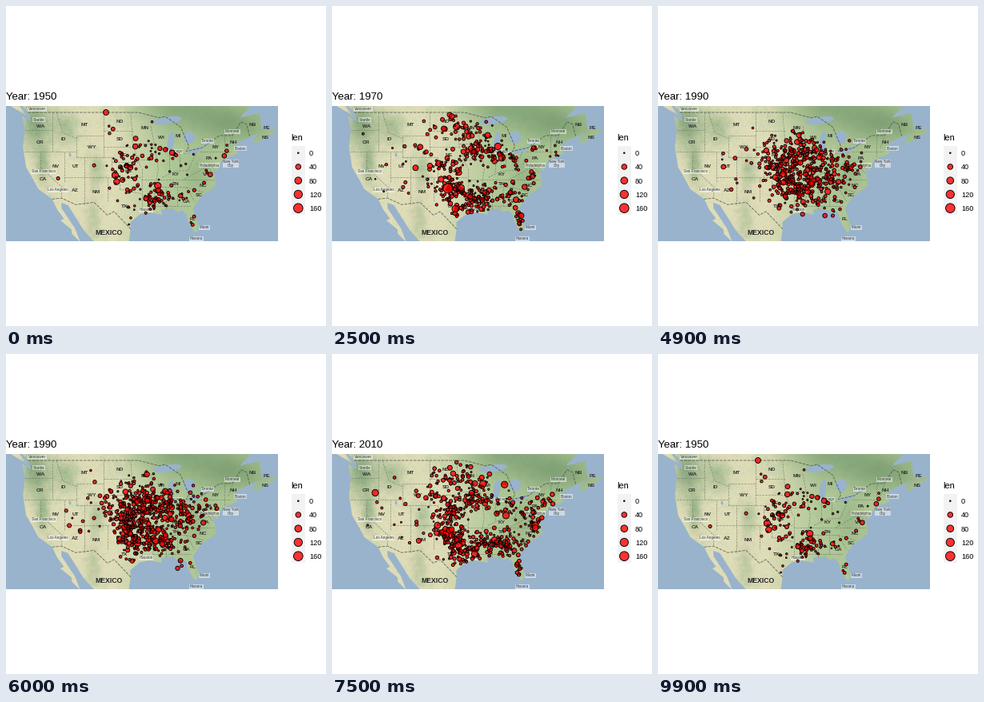
Write a matplotlib script that moves like this. It is 400 by 400 pixels and loops after 10000 ms.

```python
import numpy as np
import matplotlib.pyplot as plt
from matplotlib.animation import FuncAnimation
from matplotlib.patches import Circle, Ellipse, PathPatch, Rectangle
from matplotlib.path import Path

PX = 0.72  # points per pixel at 100 dpi
W, H, TOP = 340, 169, 125
WATER = np.array([153, 179, 204]) / 255
plt.rcParams["font.family"] = "Liberation Sans"

# Outlines, a few key points in lon/lat
PACIFIC = [(-123.2, 49), (-122.4, 47.4), (-124.7, 48.4), (-124, 46.2), (-124.5, 42.8),
           (-124.1, 41), (-123.7, 39), (-121.9, 36.6), (-120.6, 34.6), (-117.1, 32.5)]
MEXICO = [(-115.8, 30.2), (-114.1, 28.2), (-115, 27.8), (-112.2, 25.8), (-112.1, 24.8),
          (-110, 22.9), (-111.3, 26), (-114.7, 30.5), (-114.8, 31.7), (-113.1, 31.2),
          (-109.1, 25.6), (-105.5, 22), (-97.8, 22)]
ATLANTIC = [(-97.2, 25.9), (-97.3, 27.4), (-94.8, 29.2), (-92.3, 29.6), (-89.2, 29.1),
            (-89.5, 30.2), (-86.3, 30.4), (-85.3, 29.7), (-84.2, 30.1), (-83, 29.2),
            (-82.7, 27.8), (-81, 25.2), (-80.3, 25.3), (-80, 26.8), (-81.4, 30.5),
            (-79.2, 33.2), (-75.5, 35.3), (-76.3, 38.9), (-75.2, 38.3), (-74, 40.4),
            (-70, 41.7), (-70.7, 42.6), (-70.2, 43.7), (-67, 44.8)]
MARITIME = [(-64.7, 45.4), (-66.2, 44.3), (-65.6, 43.5), (-60, 46), (-64, 46.1),
            (-64.5, 48.9), (-69.5, 48.1), (-66.5, 50.2), (-59, 51), (-126, 51)]
NORTH = [(-123.2, 49), (-95.2, 49), (-90, 48.1), (-88.4, 48.3), (-84.5, 46.5),
         (-82.4, 43), (-83.1, 42.1), (-79, 42.8), (-76.5, 44.1), (-74.7, 45),
         (-71.5, 45), (-69.2, 47.4), (-67.8, 47), (-67, 44.8)]
SOUTH = [(-117.1, 32.5), (-114.7, 32.7), (-111.1, 31.3), (-106.5, 31.8), (-103.1, 29),
         (-101.4, 29.8), (-97.2, 25.9)]
ISLAND = [(-128.5, 50.7), (-125.3, 50), (-123.4, 48.4), (-127.5, 50)]
# Great Lakes and Salt Lake: centre, size, tilt in pixels
LAKES = [(202, 143, 36, 9, -8), (206, 170, 8, 26, 8), (229, 164, 14, 16, 0),
         (235, 181, 21, 5, -20), (251, 171, 16, 4, -8), (80, 186, 3, 5, 0)]

# Straight state borders as (latitude, west, east) and (longitude, south, north)
PARALLELS = [(46, -124, -117), (42, -124.2, -111), (37, -114, -94.6), (41, -111, -102),
             (45, -111, -104), (45.9, -104, -96.6), (43, -104, -96.5), (40, -102, -95.3),
             (43.5, -96.5, -91.2), (40.5, -95.7, -91.4), (36.5, -94.6, -76), (33, -94, -91),
             (35, -90.2, -83.1), (31, -91.6, -82), (42.5, -90.6, -87.8), (41.7, -87, -83.4),
             (39.7, -80.5, -75.7), (42, -79.8, -71.8)]
MERIDIANS = [(-117, 42, 49), (-120, 39, 42), (-114, 36, 42), (-109, 31.3, 41),
             (-111, 41, 45), (-104, 41, 49), (-102, 37, 41), (-103, 32, 37),
             (-100, 34.6, 36.5), (-94.4, 30, 39), (-87.5, 38, 41.7), (-84.8, 39, 41.7),
             (-88.3, 30.3, 35), (-85.3, 31, 35), (-73.4, 41, 45)]
CURVES = [[(-120, 39), (-114.6, 35), (-114.7, 32.7)],
          [(-116, 49), (-114.4, 45.5), (-111, 44.5)],
          [(-100, 34.6), (-94.4, 33.6)],
          [(-97.2, 49), (-96.5, 43), (-94.6, 39)],
          [(-92.1, 46.7), (-91.2, 43.5), (-90.2, 38.7), (-91.6, 31)],
          [(-89.2, 37), (-85.8, 38.3), (-82.6, 38.4), (-80.5, 42)],
          [(-83.1, 35), (-81, 32)], [(-83.1, 35), (-78.6, 33.9)],
          [(-83.7, 36.6), (-77.8, 39.2), (-76.3, 37.9)], [(-72.5, 42.7), (-71.1, 45.3)]]

STATES = dict(MT=(98, 148), ND=(142, 145), MN=(174, 153), WA=(43, 150), OR=(43, 170),
              ID=(72, 167), WY=(107, 176), SD=(142, 166), NE=(146, 186), NV=(62, 200),
              UT=(87, 201), CA=(46, 217), AZ=(86, 231), NM=(113, 232), TX=(148, 250),
              KS=(153, 206), WI=(194, 165), MI=(215, 163), KY=(212, 211), VA=(250, 211),
              TN=(212, 222), AL=(208, 240), GA=(226, 244), FL=(234, 266), PA=(254, 190),
              NY=(262, 177), NH=(284, 171), NB=(308, 149), PE=(326, 153), NS=(324, 164),
              NC=(246, 224), SC=(241, 237))
CITIES = {"Vancouver": (39, 129), "Seattle": (41, 142), "San Francisco": (47, 207),
          "Los Angeles": (65, 230), "Chicago": (212, 182), "Toronto": (252, 169),
          "Montreal": (283, 157), "Boston": (293, 178), "New York\nCity": (281, 197),
          "Philadelphia": (254, 199), "Houston": (175, 255), "Miami": (248, 277),
          "Havana": (238, 291)}

# Storm regions: centre and spread in pixels
REGIONS = np.array([
    (148, 202, 10, 14),   # central plains
    (165, 155, 17, 10),   # northern plains
    (183, 182, 15, 8),    # corn belt
    (225, 190, 14, 9),    # Ohio valley
    (152, 229, 13, 7),    # Oklahoma
    (160, 251, 11, 9),    # Texas
    (188, 239, 12, 8),    # lower Mississippi
    (222, 237, 11, 8),    # Georgia
    (236, 266, 4, 7),     # Florida
    (253, 212, 7, 11),    # Atlantic coast
    (272, 182, 10, 6),    # New England
    (85, 190, 28, 25),    # far west
    (125, 190, 8, 17),    # high plains
])
# Storms per year and the share of each region
YEARS = {
    1950: (175, [24, 2, 8, 9, 9, 9, 28, 5, 3, 4, 3, 1, 1]),
    1960: (340, [16, 14, 14, 12, 12, 6, 12, 7, 4, 4, 3, 2, 4]),
    1970: (460, [9, 14, 15, 9, 19, 7, 19, 5, 6, 4, 4, 3, 3]),
    1980: (540, [4, 8, 25, 14, 9, 12, 17, 13, 4, 8, 1, 4, 7]),
    1990: (800, [22, 8, 20, 13, 10, 8, 13, 7, 3, 7, 3, 3, 7]),
    2000: (680, [17, 11, 13, 9, 12, 12, 18, 9, 4, 6, 2, 5, 4]),
    2010: (600, [13, 12, 15, 9, 10, 8, 17, 10, 4, 6, 3, 4, 5]),
    2020: (580, [4, 11, 16, 4, 9, 6, 27, 14, 5, 10, 3, 4, 5]),
}
# The longest tracks: x, y, length
LONGEST = {1950: (125, 133, 45), 1970: (145, 228, 170), 1980: (139, 259, 130)}
NAMES = list(YEARS)
STARTS = [9, 22, 35, 48, 60, 72, 84, 96]  # frames where a year begins to leave


def project(points):
    """Web Mercator, lon/lat to stage pixels."""
    lon, lat = np.array(points, float).T
    north = np.degrees(np.log(np.tan(np.radians(45 + lat / 2))))
    return np.column_stack([(lon + 128.8) * 4.93, 133 + (56.37 - north) * 4.93])


def outline(points):
    return Path(project(points + points[:1]))


def radius(length):
    return 0.8 + 5 * np.sqrt(length / 160)


def make_year(year):
    """Rows of x, y, radius drawn from the regional mix."""
    rng = np.random.default_rng(year)
    count, share = YEARS[year]
    pick = rng.choice(len(REGIONS), count * 2, p=np.array(share) / sum(share))
    pos = rng.normal(REGIONS[pick, :2], REGIONS[pick, 2:])
    pos = pos[usa.contains_points(pos)][:count]
    length = np.minimum(6 * rng.exponential(size=len(pos)) ** 1.6, 70)
    rows = np.column_stack([pos, length])
    if year in LONGEST:
        rows[-1] = LONGEST[year]
    rows[:, 2] = radius(rows[:, 2])
    return rows


def relief():
    """Tan west, green east, darker forests, soft hill shading."""
    y, x = np.mgrid[TOP:TOP + H, 0:W] + 0.5

    def bump(cx, cy, sx, sy):
        return np.exp(-((x - cx) / sx) ** 2 - ((y - cy) / sy) ** 2)

    white = np.random.default_rng(4).normal(size=(H, W))
    freq = np.hypot(np.fft.fftfreq(H)[:, None], np.fft.fftfreq(W)) + 0.02
    noise = np.fft.ifft2(np.fft.fft2(white) / freq ** 1.4).real
    noise = (noise / noise.std())[..., None]
    east = np.clip((x - 135) / 70, 0, 1)[..., None]
    forest = (0.9 * bump(36, 145, 16, 34) + 0.6 * bump(46, 200, 8, 26)
              + 0.5 * bump(72, 152, 18, 20) + 0.4 * bump(112, 205, 9, 24)
              + 0.35 * bump(108, 265, 10, 30) + 0.4 * bump(240, 208, 16, 26)
              + 0.8 * bump(285, 150, 45, 22) + 0.8 * bump(225, 125, 60, 28))[..., None]
    forest = np.clip(forest + noise * (0.1 - 0.05 * east), 0, 1)
    tan, green, dark = np.array([(225, 222, 186), (175, 199, 150), (128, 162, 118)])
    color = tan + (green - tan) * east
    color = color + (dark - color) * forest + 3 * noise
    return np.clip(color / 255, 0, 1)


def draw_map(ax):
    ax.add_patch(Rectangle((0, TOP), W, H, color=WATER, lw=0))
    land = Path.make_compound_path(outline(PACIFIC + MEXICO + ATLANTIC + MARITIME),
                                   outline(ISLAND))
    picture = ax.imshow(relief(), extent=(0, W, TOP + H, TOP), aspect="auto", zorder=1)
    picture.set_clip_path(PathPatch(land, transform=ax.transData))
    for x, y, w, h, tilt in LAKES:
        ax.add_patch(Ellipse((x, y), w, h, angle=tilt, color=WATER, lw=0, zorder=2))
    borders = CURVES + [[(a, lat), (b, lat)] for lat, a, b in PARALLELS]
    borders += [[(lon, a), (lon, b)] for lon, a, b in MERIDIANS]
    for line in borders:
        ax.plot(*project(line).T, color="#6d7468", lw=0.7 * PX, alpha=0.7,
                dashes=(4, 1.5), zorder=3)
    for line in (NORTH, SOUTH):
        ax.plot(*project(line).T, color="#4a4f48", lw=0.9 * PX, alpha=0.8,
                dashes=(4, 1.5), zorder=3)
    middle = dict(ha="center", va="center", zorder=4)
    for name, place in STATES.items():
        ax.text(*place, name, size=6.5 * PX, weight="bold", color="#333333", **middle)
    box = dict(boxstyle="square,pad=0.1", fc="white", ec="none", alpha=0.5)
    for name, place in CITIES.items():
        ax.text(*place, name, size=4.6 * PX, color="#333333", linespacing=0.9, bbox=box,
                **middle)
    ax.text(128, 284, "MEXICO", size=8.7 * PX, weight="bold", color="#222222", **middle)


def draw_legend(ax):
    ax.text(356, 168, "len", size=11 * PX)
    for i, value in enumerate(range(0, 161, 40)):
        y = 183.7 + 17.25 * i
        ax.add_patch(Rectangle((356.5, y - 8.65), 17.3, 17.3, color="#f2f2f2", lw=0))
        ax.add_patch(Circle((365.3, y), radius(value), fc=(1, 0, 0, 0.8), ec="black",
                            lw=0.9 * PX, zorder=3))
        ax.text(379, y + 3.5, str(value), size=9.2 * PX)


def add_axes(x, y, w, h):
    ax = fig.add_axes([x / 400, 1 - (y + h) / 400, w / 400, h / 400])
    ax.axis("off")
    return ax


def set_view(ax, x, y, w, h):
    ax.set(xlim=(x, x + w), ylim=(y + h, y))


fig = plt.figure(figsize=(4, 4), dpi=100, facecolor="white")
page = add_axes(0, 0, 400, 400)
draw_legend(page)
set_view(page, 0, 0, 400, 400)
world = add_axes(0, TOP, W, H)
draw_map(world)
set_view(world, 0, TOP, W, H)
title = page.text(0, 117, "", size=13.2 * PX)
dots = world.scatter([], [], facecolors=[(1, 0, 0, 0.8)], edgecolors="black",
                     linewidths=0.9 * PX, zorder=5)
usa = Path(project(PACIFIC + SOUTH + ATLANTIC + NORTH[::-1]))
data = [make_year(year) for year in NAMES]


def phase(frame):
    """Year index and progress towards the next one."""
    for k, start in enumerate(STARTS):
        steps = 3 if NAMES[k] == 1980 else 4
        t = max(0, frame - start + 1) / steps
        if t < 1:
            return k, t
    return 0, 0


def update(frame):
    k, t = phase(frame)
    nxt = (k + 1) % len(NAMES)
    rows = data[k]
    if t:
        n = min(len(rows), len(data[nxt]))
        rows = rows[:n] * (1 - t) + data[nxt][:n] * t
    dots.set_offsets(rows[:, :2])
    dots.set_sizes((2 * rows[:, 2] * PX) ** 2)
    title.set_text(f"Year: {NAMES[nxt if t > 0.5 else k]}")
    return dots, title


anim = FuncAnimation(fig, update, frames=100, interval=100, repeat=True, repeat_delay=0)
plt.show()
```
